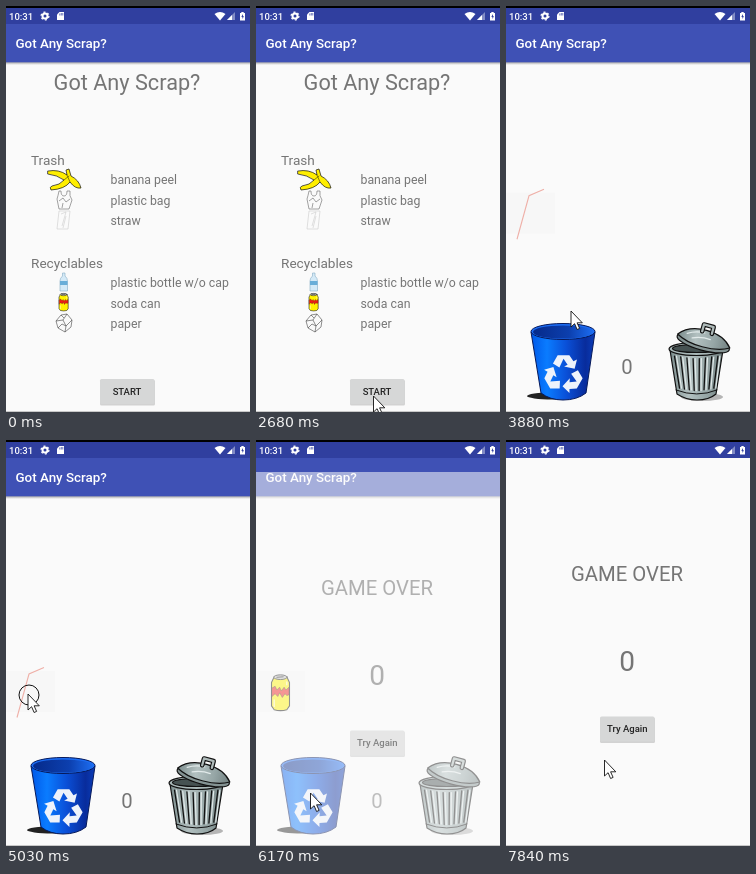
An HTML page for the animation above (7990 ms loop, 244 by 406 pixels).

```html
<!DOCTYPE html>
<html lang="en">
<head>
<meta charset="utf-8">
<title>Sorting game</title>
<style>
html, body { margin: 0; width: 100%; height: 100%; overflow: hidden; background: #fafafa; }
svg { display: block; width: 244px; height: 406px; }
text { font-family: Roboto, Arial, sans-serif; fill: #757575; }
.mid { text-anchor: middle; }
.title { font-size: 13.4px; font-weight: 500; fill: #fff; }
.head { font-size: 13.6px; }
.item { font-size: 12.3px; }
.big { font-size: 20.3px; }
.btn { font-size: 9.5px; font-weight: 500; fill: #222; }
.clock { font-size: 9.5px; font-weight: 500; fill: #fff; }
.ink { stroke: #111; stroke-linejoin: round; stroke-linecap: round; }
.thin { fill: none; stroke: #666; stroke-width: .6; stroke-linejoin: round; }
</style>
</head>
<body>
<svg viewBox="0 0 244 406">
<defs>
  <linearGradient id="blue">
    <stop stop-color="#0058e8"/><stop offset=".25" stop-color="#0a7cff"/>
    <stop offset=".55" stop-color="#0a50d8"/><stop offset=".85" stop-color="#082c9c"/>
    <stop offset="1" stop-color="#0a3cb8"/>
  </linearGradient>
  <linearGradient id="inside">
    <stop stop-color="#062a8a"/><stop offset=".6" stop-color="#0c3fae"/><stop offset="1" stop-color="#1c6cf0"/>
  </linearGradient>
  <linearGradient id="steel">
    <stop stop-color="#7c8d8d"/><stop offset=".35" stop-color="#b2c0c0"/>
    <stop offset=".7" stop-color="#95a5a5"/><stop offset="1" stop-color="#718080"/>
  </linearGradient>
  <linearGradient id="shade" x2="0" y2="1">
    <stop stop-opacity=".35"/><stop offset="1" stop-opacity="0"/>
  </linearGradient>
  <g id="page">
    <rect y="18" width="244" height="400" fill="#fafafa"/>
    <rect y="56" width="244" height="3" fill="url(#shade)"/>
    <rect y="18" width="244" height="38.3" fill="#3f51b5"/>
    <text class="title" x="9.5" y="42">Got Any Scrap?</text>
  </g>
  <g id="button">
    <rect x="94" y="374" width="55" height="25.5" rx="1.5" opacity=".16"/>
    <rect x="94" y="373" width="54.5" height="25" rx="1.5" fill="#d6d7d7"/>
  </g>
  <path id="straw" d="M11 51.5L23 8L38 1.5" fill="none" stroke="#efb0a8" stroke-width="1.1"/>
  <g id="can">
    <path class="ink" stroke-width="1.2" fill="#fff200" d="M3 3L0 9V34L3 38Q10 40 17 38L20 34V9L17 3Z"/>
    <ellipse class="ink" cx="10" cy="3.4" rx="7.5" ry="2.5" fill="#c4c4c4"/>
    <path class="ink" d="M6 3.5L13 3" fill="none"/>
    <path class="ink" stroke-width=".5" fill="#f01c18" d="M.5 15L4 13L6 17L9 14L11 18L14 14L16 17L19.5 14V22L17 23L15 21L12 25L9 20L7 24L4 21L.5 24Z"/>
    <path d="M3 27V35M17 8V12" stroke="#fffbb0" stroke-width="1.6"/>
  </g>
  <path id="arrow" fill="#eef3fb" d="M-9 -9L-5 -16H5L8.5 -10.8L11.5 -12.5L9.5 -4.5L.5 -6.5L3.5 -8L0 -13L-3.5 -5.5Z"/>
</defs>

<g id="start">
  <use href="#page"/>
  <text class="mid" x="121" y="84" font-size="21.7">Got Any Scrap?</text>
  <text class="head" x="25" y="159">Trash</text>
  <text class="head" x="25" y="262">Recyclables</text>
  <g class="item">
    <text x="104.5" y="178">banana peel</text>
    <text x="104.5" y="198.5">plastic bag</text>
    <text x="104.5" y="219">straw</text>
    <text x="104.5" y="281">plastic bottle w/o cap</text>
    <text x="104.5" y="301.5">soda can</text>
    <text x="104.5" y="322">paper</text>
  </g>
  <path class="ink" stroke-width=".7" fill="#fe0" d="M42 165Q53 163 61 169L60 164L63 163L65 170Q73 174 75 182Q69 183 64 176Q59 183 45 184Q43 181 46 180Q54 179 58 174Q51 169 42 168Z"/>
  <path class="ink" stroke-width=".5" fill="none" d="M61 169L64 176M58 174L63 170"/>
  <path class="thin" d="M53 185Q52 190 51 193L53 203H63L66 194Q63 190 64 185H61Q61 190 58 190Q55 190 55 185ZM53 195L57 192L60 196L64 193M56 202L57 197"/>
  <path class="thin" style="stroke:#ccc" d="M53 205H64L62 223H51ZM55 208L60 206L56 220M60 210L57 222"/>
  <path fill="#d5eaf7" stroke="#84abc4" stroke-width=".6" d="M56.5 267H59V270Q61.5 272 61.5 275V285H54V275Q54 272 56.5 270Z"/>
  <path fill="#6aaed8" d="M54 275H61.5V279H54Z"/>
  <use href="#can" transform="translate(53 287) scale(.46)"/>
  <path class="thin" style="stroke:#444" d="M50 315L55 309L61 308L66 314L65 321L59 326L52 322ZM50 315L57 314L61 308M57 314L60 320L66 314M60 320L59 326M52 322L56 318L60 320M55 309L58 312"/>
  <use href="#button"/>
  <ellipse id="ripple" cx="121" cy="386" rx="27" ry="12.5"/>
  <text class="btn mid" x="121" y="388.5">START</text>
</g>

<g id="game">
  <use href="#page"/>
  <rect id="tile" y="5" width="49" height="41" fill="#f7f7f7"/>
  <ellipse cx="46" cy="390" rx="25" ry="3.5" fill="#222"/>
  <path fill="url(#blue)" stroke="#06195a" d="M25 326L35 387Q44 394 57 394Q71 394 80 387L89 326Z"/>
  <ellipse cx="57" cy="325.5" rx="32" ry="8" fill="#1b6cf4" stroke="#06195a"/>
  <ellipse cx="57" cy="326" rx="30" ry="6.6" fill="url(#inside)"/>
  <g transform="translate(57.5 368) scale(1.17)">
    <use href="#arrow"/><use href="#arrow" transform="rotate(120)"/><use href="#arrow" transform="rotate(240)"/>
  </g>
  <text class="big mid" x="121" y="368">0</text>
  <ellipse cx="196" cy="391" rx="21" ry="4" fill="#b5b5b5"/>
  <g class="ink" stroke-width="1.2">
    <path fill="url(#steel)" d="M164 344L171 388Q180 394 191 394Q203 394 210 388L217 344Z"/>
    <path id="glints" fill="none" stroke="#e2eaea" stroke-width="1.2"/>
    <path id="ribs" fill="none" stroke-width="1.3"/>
    <path fill="none" stroke-width="1" d="M170 384Q191 392 211 384"/>
    <ellipse cx="190.5" cy="343" rx="27.5" ry="6.5" fill="#a9b8b8"/>
    <ellipse cx="190.5" cy="342.5" rx="24" ry="4" fill="#465252"/>
    <g transform="rotate(15 198 334)">
      <ellipse cx="198" cy="337" rx="27" ry="7.5" fill="#849393"/>
      <path fill="url(#steel)" d="M171 335Q180 324 198 324Q216 324 225 335Q215 341 198 341Q181 341 171 335Z"/>
      <path fill="none" stroke="#e2eaea" d="M180 332Q188 327 197 327M186 335Q195 331 204 332"/>
      <path fill="none" stroke-width="4.6" d="M194 326V319H204V326"/>
      <path fill="none" stroke="#aebab9" stroke-width="2.3" d="M194 326V319H204V326"/>
    </g>
  </g>
  <use id="soda" href="#can" transform="translate(15.5 234) scale(.9 .94)"/>
  <use id="sip" href="#straw"/>
</g>

<g id="over">
  <rect y="18" width="244" height="400" fill="#fafafa"/>
  <text class="big mid" x="121" y="141">GAME OVER</text>
  <text class="mid" x="121" y="231" font-size="28">0</text>
  <use href="#button" y="-96.5"/>
  <text class="btn mid" x="121.3" y="292.3">Try Again</text>
</g>

<rect width="244" height="18" fill="#303f9f"/>
<rect width="244" height="2"/>
<rect y="405" width="244" height="1" fill="#c8c8c8"/>
<g fill="#fff">
  <text class="clock" x="3" y="13.5">10:31</text>
  <circle cx="39" cy="10" r="2.5" fill="none" stroke="#fff" stroke-width="2"/>
  <circle cx="39" cy="10" r="3.9" fill="none" stroke="#fff" stroke-width="1.3" stroke-dasharray="2 2.084"/>
  <path d="M53.5 6H58V14H51V8.5Z"/>
  <path d="M53.8 7.5V9.5M55.3 7V9.5M56.8 7V9.5" stroke="#303f9f" stroke-width=".7"/>
  <path d="M208.5 8Q214 4 219.5 8L214 14.5Z"/>
  <path d="M229 6V14H221Z" opacity=".4"/><path d="M226 9V14H221Z"/>
  <path d="M234 7H235.3V6H237.7V7H239V14.5H234Z"/>
  <path d="M237 8L235.3 11H236.4V13L238 10.3H237Z" fill="#303f9f"/>
</g>
<g id="cursor">
  <circle id="ring" cx="1" cy="1" r="10" fill="none" stroke="#111"/>
  <path d="M0 0V16L3.6 12.7L6.1 18.5L8.6 17.4L6.1 11.8H11.3Z" fill="#fff" stroke="#111" stroke-width=".9"/>
</g>
</svg>
<script>
const LOOP = 7990;
// The picture only refreshes at these moments.
const ticks = [0, 500, 620, 740, 1860, 1980, 2130, 2380, 2530, 2680, 2830, 2950, 3100, 3220, 3340,
  3490, 3640, 3760, 3880, 4000, 4120, 4270, 4390, 4540, 4790, 4910, 5030, 5150, 5270, 5410, 5530,
  5650, 5770, 5890, 6170, 6320, 6440, 7710, 7840];
const pointer = [[499, 117.5, 407], [500, 117.5, 402], [740, 117.5, 390], [3520, 117.5, 390],
  [3880, 65, 305], [4120, 35, 258], [4390, 22, 254], [5030, 22, 254], [5150, 25, 280],
  [5270, 33, 313], [5410, 45, 340], [5530, 54.5, 353], [7580, 54.5, 353], [7840, 98.5, 320]];
const drag = [[5030, 0, 0], [5150, 0, 4], [5270, 1, 15], [5410, 10, 61], [5530, 20, 87]];

const $ = id => document.getElementById(id);
const within = (t, from, to) => t >= from && t < to;

function along(keys, t) {
  const i = keys.findIndex(k => k[0] > t);
  if (i < 0) return keys.at(-1).slice(1);
  if (i === 0) return keys[0].slice(1);
  const [a, b] = [keys[i - 1], keys[i]];
  const f = (t - a[0]) / (b[0] - a[0]);
  return [1, 2].map(n => a[n] + (b[n] - a[n]) * f);
}
function show(id, alpha) {
  $(id).setAttribute("opacity", Number(alpha));
}
function move(id, x, y) {
  $(id).setAttribute("transform", `translate(${x} ${y})`);
}
// A screen fades in while sliding up into place.
function enter(id, t, begin, lift, mid) {
  const step = t < begin ? 0 : t < begin + mid ? 1 : t < begin + 270 ? 2 : 3;
  show(id, [0, .55, 1, 1][step]);
  move(id, 0, [0, lift, 2, 0][step]);
}
function grooves(shift) {
  let d = "";
  for (let i = 0; i < 8; i++) {
    const sag = 3 - Math.abs(i - 3.5) * .8;
    d += `M${168.5 + i * 6.2 + shift} ${350 + sag}L${173.5 + i * 4.9 + shift} ${382 + sag}`;
  }
  return d;
}
$("ribs").setAttribute("d", grooves(0));
$("glints").setAttribute("d", grooves(2));

function draw(now) {
  const time = now % LOOP;
  const t = ticks.findLast(k => k <= time);

  enter("game", t, 2830, 12, 120);
  enter("over", t, 6170, 14, 150);
  show("ripple", within(t, 2130, 2680) ? (t < 2380 ? .09 : .05) : 0);

  const p = Math.min(1, Math.max(0, (t - 2767) / 1700));
  const fall = 60 + 166 * (1 - Math.cos(Math.PI * p)) / 2;
  const [dx, dy] = along(drag, t);
  move("tile", 0, fall);
  move("sip", dx, fall + dy);
  show("sip", t < 5650);
  show("soda", t >= 5150);

  move("cursor", ...along(pointer, t));
  show("ring", within(t, 1860, 1980) || within(t, 4790, 5650));
  requestAnimationFrame(draw);
}
draw(0);
</script>
</body>
</html>
```
